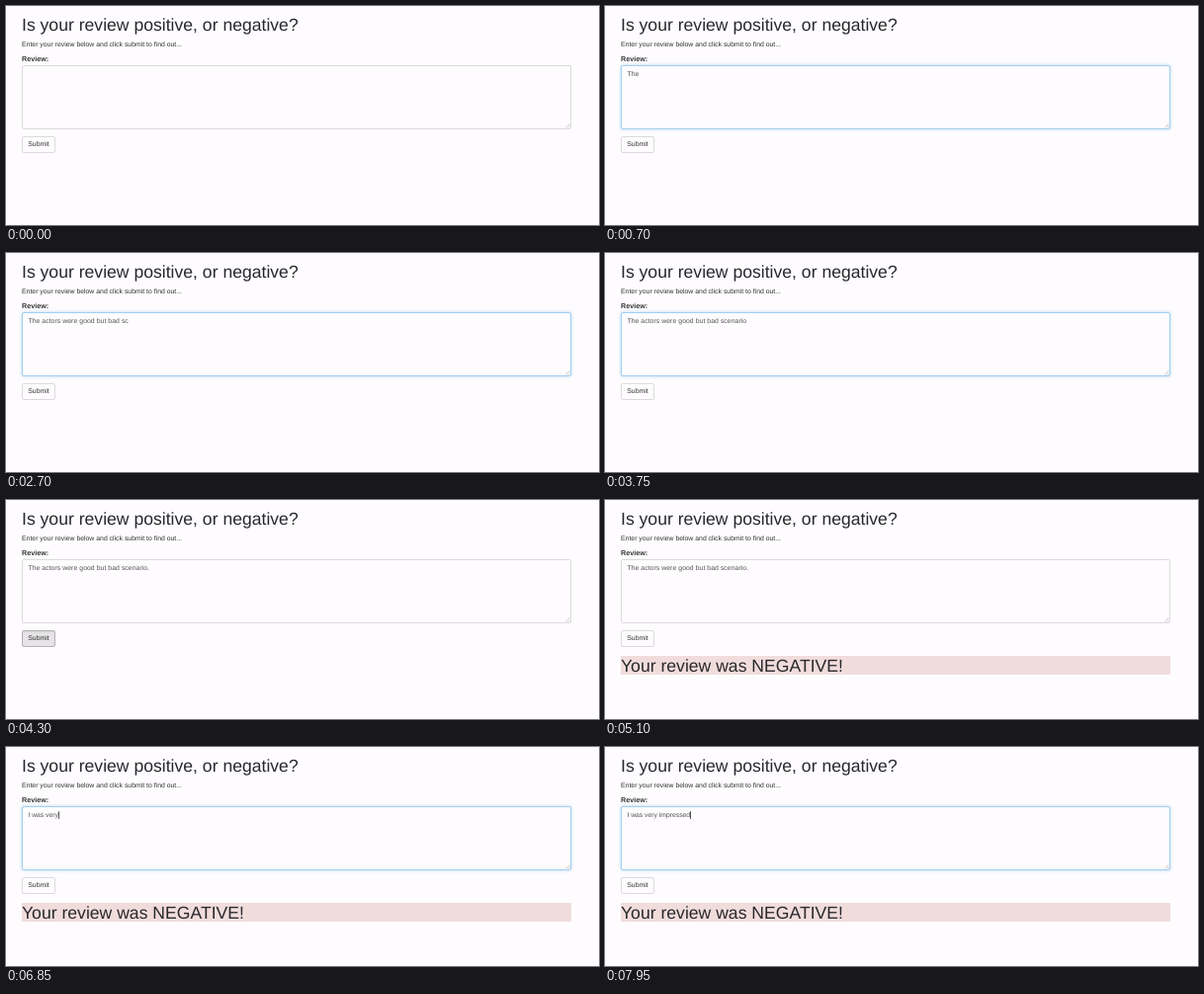
An HTML page for the animation above (8 s loop, 600 by 222 pixels).

```html
<!DOCTYPE html>
<html lang="en">
<head>
<meta charset="utf-8">
<title>Review sentiment</title>
<style>
  html, body { margin: 0; width: 100%; height: 100%; overflow: hidden; background: #fefcfe; }
  #stage { position: relative; width: 600px; height: 222px; overflow: hidden; }
  #stage > * { position: absolute; box-sizing: border-box; }
  .area { left: 16px; top: 60px; width: 556px; height: 65px; border: 1px solid #dcdadc; border-radius: 2px; }
  #glow { border-color: #a4cff1; box-shadow: 0 0 3.5px rgba(102, 175, 233, .5); opacity: 0; }
  #button { left: 16px; top: 132px; width: 34px; height: 17px; border: 1px solid #dcdadc; border-radius: 2px; }
  #button.active { background: #e6e4e6; border-color: #b4b2b4; box-shadow: inset 0 1px 2px rgba(0, 0, 0, .08); }
  #result { left: 16px; top: 158px; width: 556px; height: 19px; background: #f1dcdc; }
  svg { left: 0; top: 0; }
  text { font: 6.84px "Liberation Sans", Arial, sans-serif; fill: #333; text-rendering: geometricPrecision; white-space: pre; }
  .big { font-size: 17.6px; fill: #28282c; }
  .label { font-weight: bold; font-size: 7.2px; }
</style>
</head>
<body>
<div id="stage">
  <div class="area"></div>
  <div class="area" id="glow"></div>
  <div id="button"></div>
  <div id="result"></div>
  <svg width="600" height="222" viewBox="0 0 600 222">
    <text class="big" x="16" y="25.3">Is your review positive, or negative?</text>
    <text x="16" y="41.3" letter-spacing=".02">Enter your review below and click submit to find out...</text>
    <text class="label" x="16" y="56">Review:</text>
    <path d="M566.5 123.5l4-4M569 123.5l1.5-1.5" stroke="#aaa" stroke-width=".6" fill="none"/>
    <rect id="mark" x="22" y="65" width="124" height="9" fill="#3390ff"/>
    <text id="typed" x="22.4" y="71.3"></text>
    <rect id="caret" y="65.3" width=".8" height="7.6" fill="#222"/>
    <text x="22.3" y="142.4">Submit</text>
    <text class="big" id="verdict" x="16" y="174.1">Your review was NEGATIVE!</text>
  </svg>
</div>
<script>
const LOOP = 8000, FOCUS = 50, SUBMIT = 4050, REFOCUS = 5400, RETYPE = 5850;
const $ = id => document.getElementById(id);
const [glow, button, result, mark, typed, caret, verdict] =
  ['glow', 'button', 'result', 'mark', 'typed', 'caret', 'verdict'].map($);

// Spreads the keystrokes of a burst evenly between two times.
const burst = (text, from, to = from) =>
  [...text].map((char, i) => ({ char, at: from + (to - from) * i / Math.max(1, text.length - 1) }));

const first = {
  spacing: .065, lag: 75,
  keys: [
    burst('The actors w', 450, 1200), burst('ere', 1350, 1500),
    burst(' good but bad s', 1560, 2430), burst('c', 2500), burst('e', 2850),
    burst('nario', 3100, 3450), burst('.', 3800)
  ].flat()
};
const second = {
  spacing: -.02, lag: 0,
  keys: [
    burst('I', RETYPE), burst(' was ver', 5920, 6600),
    burst('y imp', 6700, 7350), burst('ressed', 7650, 7930)
  ].flat()
};

const within = (t, a, b) => t >= a && t < b;
const ease = p => { p = Math.min(1, Math.max(0, p)); return p * p * (3 - 2 * p); };
const fade = (t, from) => ease((t - from) / 100);
const show = (el, on) => { el.style.visibility = on ? 'visible' : 'hidden'; };

function draw(t) {
  glow.style.opacity = fade(t, FOCUS) - fade(t, SUBMIT) + fade(t, REFOCUS);
  button.className = within(t, SUBMIT + 100, 5100) ? 'active' : '';
  show(result, t >= 4450);
  show(verdict, t >= 4450);

  const selected = within(t, REFOCUS + 100, RETYPE);
  show(mark, selected);
  typed.style.fill = selected ? '#fff' : '#555';

  const review = t < RETYPE ? first : second;
  const done = review.keys.filter(key => key.at <= t);
  const text = done.map(key => key.char).join('');
  if (typed.textContent !== text) {
    typed.style.letterSpacing = review.spacing + 'px';
    typed.textContent = text;
  }

  // The caret shows briefly after each keystroke, then blinks off.
  const idle = t - (done.length ? done.at(-1).at : FOCUS);
  const blink = t < SUBMIT + 50 || t >= RETYPE ? within(idle, review.lag, 200) : false;
  show(caret, blink);
  if (blink) caret.setAttribute('x', 22.4 + (text ? typed.getComputedTextLength() : 0));
}

let begin;
function tick(now) {
  begin ??= now;
  draw((now - begin) % LOOP);
  requestAnimationFrame(tick);
}
draw(0);
requestAnimationFrame(tick);
</script>
</body>
</html>
```
